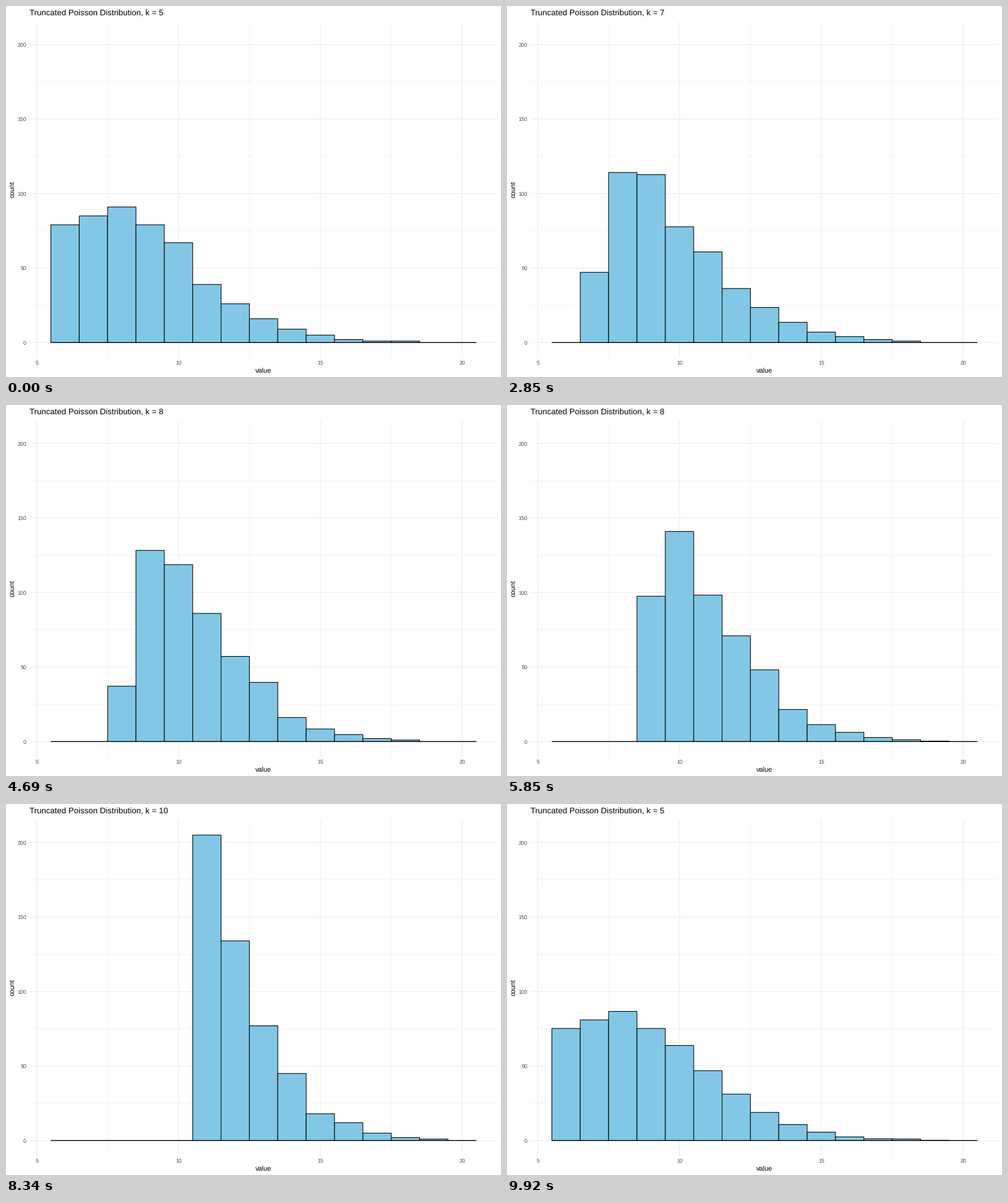
Recreate the animation shown at these times as a matplotlib script. Size 800 px wide and 600 px high, loop 9990 ms.

```python
import math

import matplotlib.pyplot as plt
import numpy as np
from matplotlib.animation import FuncAnimation

plt.rcParams.update({"font.family": "Liberation Sans", "text.hinting": "none"})

W, H, DPI = 800, 600, 100
PX = 72 / DPI                      # points per pixel
LOOP, TICK = 9990, 30
STEP, STEPS, TWEEN = 70, 15, 21    # ms per step, steps per change, tween length
STARTS = [600, 2290, 3990, 5640, 7290, 8940]   # when each change begins

LEFT, RIGHT, TOP, BOTTOM = 38.1, 794.5, 25.4, 568.7
X5, UNIT = 49.6, 45.84             # x of value 5, pixels per value
Y0, COUNT = 544.3, 2.41            # y of count 0, pixels per count

DRAWS, RATE = 500, 8
VALUES = np.arange(6, 21)
# Leading counts for each k; the rest of the draws follow the Poisson tail
HEADS = {
    5: [79, 85, 91, 79, 67],
    6: [110, 93, 91, 64, 54],
    7: [130, 129, 88, 66, 35],
    8: [128, 131, 94, 66, 46],
    9: [173, 112, 87, 55, 36],
    10: [205, 134, 77, 45, 18],
}
KS = list(HEADS)


def poisson(v):
    return math.exp(-RATE) * RATE ** int(v) / math.factorial(int(v))


def sample(k):
    """Counts of all values for draws that must exceed k."""
    head = HEADS[k]
    first = k - 5
    last = first + len(head)
    tail = np.array([poisson(v) for v in VALUES[last:]])
    row = np.zeros(len(VALUES))
    row[first:last] = head
    row[last:] = np.round(tail / tail.sum() * (DRAWS - sum(head)))
    return row


SAMPLES = [sample(k) for k in KS]


def px(value):
    return X5 + (value - 5) * UNIT


def py(count):
    return Y0 - count * COUNT


fig = plt.figure(figsize=(W / DPI, H / DPI), dpi=DPI, facecolor="white")
ax = fig.add_axes([0, 0, 1, 1])
ax.axis("off")


def line(xs, ys, color, width, z):
    ax.plot(xs, ys, color=color, lw=width * PX, zorder=z, snap=False,
            solid_capstyle="butt")


def label(x, y, text, size, color="black", **kw):
    return ax.text(x, y, text, fontsize=size * PX, color=color,
                   va="baseline", **kw)


def grid(values, counts, width):
    for v in values:
        line([px(v)] * 2, [TOP, BOTTOM], "#ebebeb", width, 1)
    for c in counts:
        line([LEFT, RIGHT], [py(c)] * 2, "#ebebeb", width, 1)


grid(np.arange(7.5, 20, 5), range(25, 200, 50), 0.53)
grid(range(5, 21, 5), range(0, 201, 50), 1.07)

for v in range(5, 21, 5):
    label(px(v), 580.3, str(v), 8.8, "#4d4d4d", ha="center")
for c in range(0, 201, 50):
    label(33, py(c) + 3.2, str(c), 8.8, "#4d4d4d", ha="right")
label(416.3, 593.6, "value", 11, ha="center")
label(13.7, 297, "count", 11, ha="center", rotation=90,
      rotation_mode="anchor")
title = label(38.4, 15, "", 13.2)

bars = ax.bar(px(VALUES), np.zeros(len(VALUES)), UNIT, bottom=Y0,
              color="#82c8e6", edgecolor="black", linewidth=1.07 * PX,
              snap=False, zorder=2)
line([px(5.5), px(20.5)], [Y0, Y0], "black", 1.07, 3)
ax.set_xlim(0, W)
ax.set_ylim(H, 0)


def pose(t):
    """Return the two states at time t and the share of the second."""
    n = sum(t >= s for s in STARTS) - 1
    if n < 0:
        return 0, 0, 0
    step = (t - STARTS[n]) // STEP
    share = 1 if step >= STEPS else (step * STEP // 50 + 1) / TWEEN
    return n, (n + 1) % len(KS), share


def update(i):
    a, b, share = pose(i * TICK + 20)
    mix = SAMPLES[a] * (1 - share) + SAMPLES[b] * share
    for bar, h in zip(bars, mix):
        bar.set_height(-h * COUNT)
    k = KS[b if share > 0.5 else a]
    title.set_text(f"Truncated Poisson Distribution, k = {k}")
    return [*bars, title]


anim = FuncAnimation(fig, update, frames=LOOP // TICK, interval=TICK,
                     init_func=lambda: update(0), repeat=True,
                     repeat_delay=0, blit=False)
plt.show()
```
